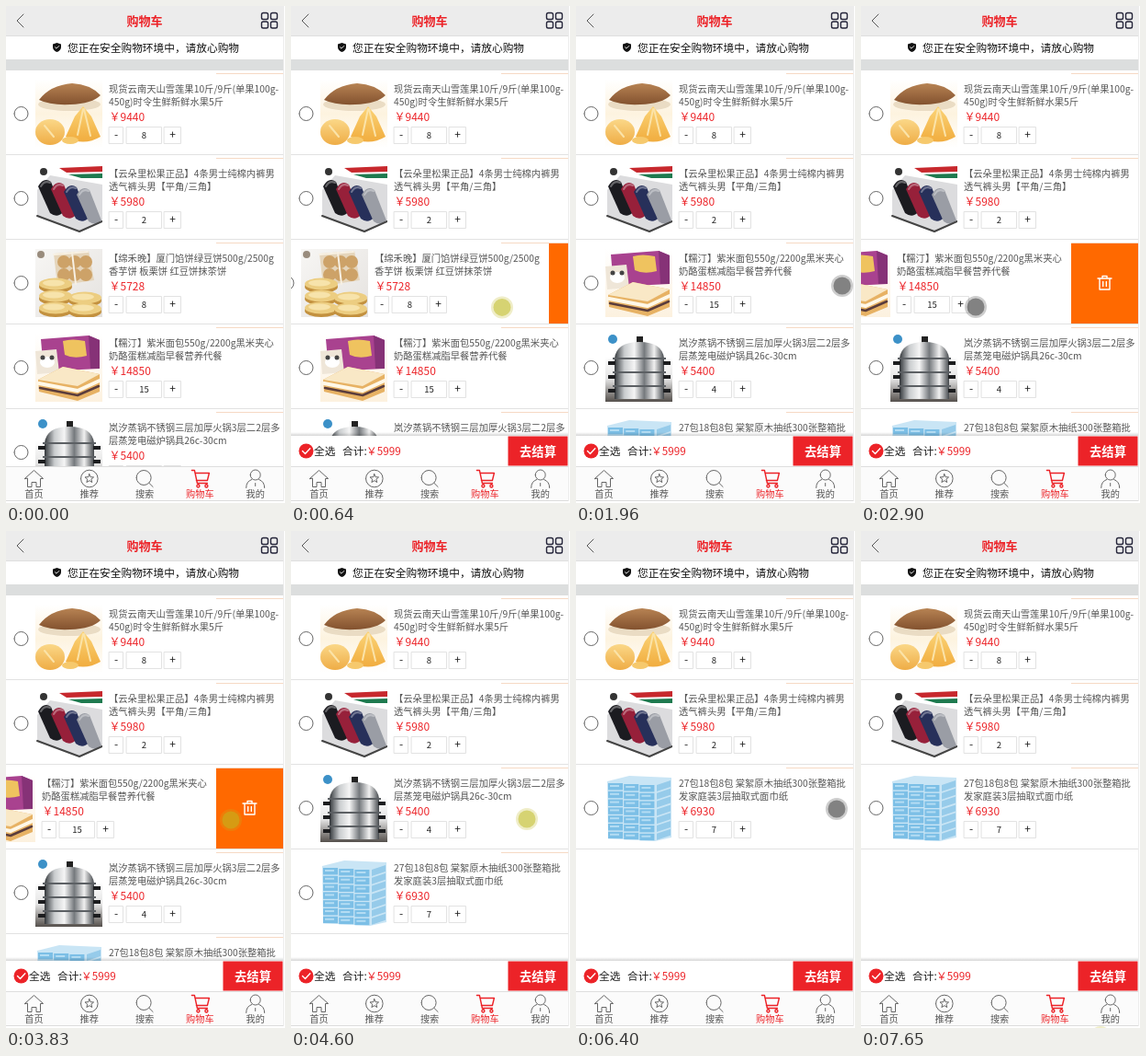
Animation of 304x540 px, one loop 7820 ms. Source, as an HTML page with a canvas:

```html
<!DOCTYPE html>
<html lang="zh-CN">
<head>
<meta charset="utf-8">
<title>购物车</title>
<style>
html, body { margin: 0; width: 100%; height: 100%; overflow: hidden; background: #fff; }
canvas { display: block; width: 304px; height: 540px; }
</style>
</head>
<body>
<canvas id="stage"></canvas>
<script>
const W = 304, H = 540, PAGE = 302, LOOP = 7820, STEP = 77;
const LIST_TOP = 70, ROW_H = 92, OPEN = 73, PHOTO = 73;
const RED = '#ec2328', ORANGE = '#ff6900', LINE = '#e2e2e2';
const FONT = '"Noto Sans CJK SC", "Noto Sans CJK", "Noto Sans", sans-serif';

const canvas = document.getElementById('stage');
const dpr = window.devicePixelRatio || 1;
canvas.width = W * dpr;
canvas.height = H * dpr;
const c = canvas.getContext('2d');

// Drawing helpers
function text(s, x, y, size, color, align = 'left', weight = 400) {
  c.font = `${weight} ${size}px ${FONT}`;
  c.textAlign = align;
  c.fillStyle = color;
  c.fillText(s, x, y);
}
function rect(x, y, w, h, color) {
  c.fillStyle = color;
  c.fillRect(x, y, w, h);
}
function box(x, y, w, h) {
  c.strokeStyle = LINE;
  c.lineWidth = 1;
  c.strokeRect(x, y, w, h);
}
function oval(x, y, rx, ry, color, turn = 0) {
  c.beginPath();
  c.ellipse(x, y, rx, ry, turn, 0, Math.PI * 2);
  c.fillStyle = color;
  c.fill();
}
function fill(d, color) {
  c.fillStyle = color;
  c.fill(new Path2D(d));
}
function line(d, color, width = 1) {
  c.strokeStyle = color;
  c.lineWidth = width;
  c.lineJoin = c.lineCap = 'round';
  c.stroke(new Path2D(d));
}
function blend(x0, y0, x1, y1, ...colors) {
  const g = c.createLinearGradient(x0, y0, x1, y1);
  colors.forEach((s, i) => g.addColorStop(i / (colors.length - 1), s));
  return g;
}
function at(x, y, draw) {
  c.save();
  c.translate(x, y);
  draw();
  c.restore();
}
const ring = (x, y, r) => `M${x - r} ${y}a${r} ${r} 0 1 0 ${2 * r} 0a${r} ${r} 0 1 0 ${-2 * r} 0`;

// Product pictures
function drawFruit() {
  rect(0, 0, PHOTO, 74, blend(0, 0, 0, 74, '#fff', '#fdf3df', '#fff'));
  oval(37, 27, 34, 7, '#eadcc4');
  fill('M4 22Q16 6 40 4Q60 5 71 17Q62 26 38 27Q16 28 4 22Z', blend(0, 4, 0, 27, '#b78353', '#83522f'));
  oval(16, 57, 16, 14, blend(0, 42, 0, 70, '#fbd98a', '#efae48'));
  fill('M33 62L43 40L52 29L61 40L71 62Q52 73 33 62Z', blend(0, 29, 0, 70, '#fbd477', '#f0aa3b'));
  line('M52 32L46 60M53 32L60 61M10 50L20 62', '#fbe3a8', 2);
  oval(38, 66, 9, 4, '#f6c96d');
}
function drawBriefs() {
  oval(9, 8, 4, 4, '#333');
  fill('M26 4L73 2V8L34 9Z', '#c7282d');
  fill('M36 11L73 10V15L50 15Z', '#1e7a4f');
  fill('M2 28L16 12L73 22V62L48 73L2 56Z', '#dcdcde');
  ['#1b1b20', '#97203a', '#27305a', '#9a9da5'].forEach((color, i) =>
    at(3 + i * 14, 19 + i * 3, () => {
      fill('M0 5Q6 -6 14 0L27 33Q21 40 13 34Z', color);
      line('M3 5Q7 -2 13 1', '#ffffff55', 2);
    }));
  line('M2 56L48 73L73 62', '#444', 2);
}
function drawPies() {
  rect(0, 0, PHOTO, 74, blend(0, 0, 73, 74, '#f7f6f4', '#e5e2df'));
  oval(6, 6, 4, 4, '#998c7d');
  fill('M20 5L58 2L64 34L24 40Z', '#e5d5bb');
  for (let i = 0; i < 6; i++) oval(31 + i % 3 * 12, 14 + (i / 3 | 0) * 14, 7, 7, '#cda268');
  line('M20 6L57 3M40 4L44 38', '#f8f1e4', 2);
  [[22, 38], [22, 51], [22, 64], [54, 53], [54, 65]].forEach(([x, y]) => {
    oval(x, y + 3, 18, 7, '#c3913f');
    oval(x, y, 18, 6.5, '#eccd81');
    oval(x - 2, y - 1, 12, 3.5, '#f7e3ab');
  });
}
function drawBread() {
  rect(0, 0, PHOTO, 74, blend(0, 0, 0, 74, '#fff', '#fcf1df'));
  fill('M6 6L58 2L70 7V38L9 41Z', '#a9428f');
  fill('M58 2L70 7V38L60 38Z', '#863277');
  fill('M30 8Q40 5 54 8L56 24Q42 28 32 23Z', '#efc35f');
  fill('M0 19L23 17L26 42L2 44Z', '#efe6d8');
  oval(13, 31, 8, 6, '#fff');
  [8, 18].forEach(x => oval(x, 26, 2.5, 2.5, '#444'));
  fill('M3 50L30 36L70 44V63L46 73L4 63Z', '#e7b264');
  fill('M3 50L30 36L70 44L46 57Z', '#f9e8c6');
  line('M4 54L46 62L70 51', '#fff8e8', 4);
  line('M5 59L46 67L69 57', '#5b3d3c', 2.5);
}
function drawSteamer() {
  rect(0, 0, PHOTO, 74, blend(0, 0, 0, 74, '#fff', '#fff', '#e4e4e4', '#55504c'));
  oval(8, 6, 5, 5, '#3c91c8');
  const steel = blend(10, 0, 64, 0, '#33373b', '#c9ccce', '#f5f5f5', '#75797d', '#f0f0f0', '#45494d');
  rect(34, 3, 7, 7, '#222');
  fill('M10 27Q12 9 37 9Q62 9 64 27Z', steel);
  for (let y = 27; y < 70; y += 15) {
    rect(10, y, 54, 14, steel);
    rect(8, y - 1, 58, 2, '#5c6064');
    [3, 63].forEach(x => rect(x, y + 3, 8, 4, '#1c1d1f'));
  }
}
function drawTissues() {
  fill('M2 8L26 2L72 4V69L54 73L3 70Z', '#c9e5f5');
  for (let r = 0; r < 7; r++) {
    const y = 10 + r * 8.8;
    for (let k = 0; k < 3; k++) {
      rect(3 + k * 17.2, y + k, 16, 7.4, '#7cbfe6');
      rect(5 + k * 17.2, y + k + 2, 10, 2, '#b3dcf3');
    }
    fill(`M56 ${y + 2}l15 -5v7l-15 5Z`, '#96cbea');
  }
}

const items = [
  { title: ['现货云南天山雪莲果10斤/9斤(单果100g-', '450g)时令生鲜新鲜水果5斤'], price: 9440, count: 8, photo: drawFruit },
  { title: ['【云朵里松果正品】4条男士纯棉内裤男', '透气裤头男【平角/三角】'], price: 5980, count: 2, photo: drawBriefs },
  { title: ['【绵禾晚】厦门馅饼绿豆饼500g/2500g', '香芋饼 板栗饼 红豆饼抹茶饼'], price: 5728, count: 8, photo: drawPies },
  { title: ['【糯汀】紫米面包550g/2200g黑米夹心', '奶酪蛋糕减脂早餐营养代餐'], price: 14850, count: 15, photo: drawBread },
  { title: ['岚汐蒸锅不锈钢三层加厚火锅3层二2层多', '层蒸笼电磁炉锅具26c-30cm'], price: 5400, count: 4, photo: drawSteamer },
  { title: ['27包18包8包 棠絮原木抽纸300张整箱批', '发家庭装3层抽取式面巾纸'], price: 6930, count: 7, photo: drawTissues }
];

// Each swipe opens the third row; the tap that follows deletes it
const swipes = [
  { start: 570, turn: 955, tap: 1720, gone: 1890 },
  { start: 2660, turn: 2891, tap: 3430, gone: 3980 },
  { start: 4600, turn: 4842, tap: 5930, gone: 6100 }
];
const [first, second, third] = swipes;

const moves = [];
function go(start, end, x, y) {
  const last = moves[moves.length - 1] || { x: 250, y: 575 };
  moves.push({ start, end, x, y, from: last });
}
function swipe(s, end, far, back) {
  go(s.start, s.turn, ...far);
  go(s.turn, end, ...back);
}
go(33, 260, 251, 330);
swipe(first, 1260, [146, 317], [290, 304]);
go(2360, 2510, 282, 301);
swipe(second, 3130, [125, 327], [245, 314]);
go(4380, 4600, 257, 313);
swipe(third, 5150, [150, 318], [294, 302]);
go(5550, 5780, 284, 302);
go(6400, 6630, 248, 500);
go(6800, 7100, 261, 550);

function pointerAt(t) {
  const m = moves.filter(m => m.start <= t).pop();
  if (!m) return moves[0].from;
  const elapsed = Math.floor((t - m.start) / STEP + 0.2) * STEP;
  const p = Math.min(1, elapsed / (m.end - m.start));
  return { x: m.from.x + (m.x - m.from.x) * p, y: m.from.y + (m.y - m.from.y) * p };
}
// The row follows the finger up to the width of the delete button
function slideAt(t) {
  const s = swipes.find(s => t >= s.start && t < s.gone);
  if (!s) return 0;
  const pulled = pointerAt(s.start).x - pointerAt(Math.min(t, s.turn - 1)).x;
  return Math.round(Math.min(OPEN, pulled));
}
const isDown = t => t >= 7650 || swipes.some(s =>
  t >= s.start && t < s.turn - STEP || t >= s.tap && t < s.gone);

function drawHeader() {
  rect(0, 0, PAGE, 32, '#ececec');
  rect(0, 32, PAGE, 1, '#dedede');
  line('M19 9L12 16L19 23', '#555');
  text('购物车', 151, 20.5, 13, RED, 'center', 700);
  for (let i = 0; i < 4; i++) {
    c.beginPath();
    c.roundRect(278.5 + i % 2 * 10, 7.5 + (i >> 1) * 9.5, 7, 7, 1.8);
    c.strokeStyle = '#25253a';
    c.lineWidth = 1.4;
    c.stroke();
  }
  fill('M55.5 40L60 41.5V45Q59.5 48.5 55.5 50Q51.5 48.5 51 45V41.5Z', '#111');
  line('M53.5 44.8L55 46.2L57.7 43.5', '#fff', 0.9);
  text('您正在安全购物环境中，请放心购物', 67, 49.5, 11.7, '#111');
  rect(0, 58, PAGE, 12, '#dcdede');
}

function drawItem({ title, price, count, photo }) {
  line(ring(16.5, 47, 7.5), '#555', 0.9);
  at(32, 10, () => {
    c.beginPath();
    c.rect(0, 0, PHOTO, 74);
    c.clip();
    photo();
  });
  title.forEach((s, i) => text(s, 112, 23.5 + i * 14, 10.3, '#555'));
  text('￥' + price, 112.5, 55, 12, RED);
  box(112.5, 61.5, 15, 18);
  box(131.5, 61.5, 38, 18);
  box(172.5, 61.5, 18, 18);
  text('-', 120, 74, 12, '#222', 'center');
  text(count, 150.5, 74, 9.5, '#222', 'center');
  text('+', 181.5, 74, 12, '#222', 'center');
}

function drawDelete() {
  rect(0, 4, OPEN, 87, ORANGE);
  line('M29 42H44M34 42V39.5H39V42M31 42V54H42V42M34.7 45.5V50.5M38.3 45.5V50.5', '#fff', 1.4);
}

function drawList(t) {
  c.save();
  c.beginPath();
  c.rect(0, LIST_TOP, PAGE, 430);
  c.clip();
  const gone = swipes.filter(s => t >= s.gone).length;
  const shown = [...items.slice(0, 2), ...items.slice(2 + gone)].slice(0, 5);
  shown.forEach((item, i) => at(0, LIST_TOP + i * ROW_H, () => {
    const dx = i === 2 ? slideAt(t) : 0;
    rect(PAGE - OPEN, 3, OPEN, 1, '#f6d9c4');
    at(-dx, 0, () => drawItem(item));
    if (dx) at(PAGE - dx, 0, drawDelete);
    rect(0, 91, PAGE, 1, LINE);
  }));
  c.restore();
}

function drawCheckout() {
  rect(0, 463, PAGE, 4, blend(0, 463, 0, 467, 'rgba(0,0,0,0)', 'rgba(0,0,0,.16)'));
  rect(0, 467, PAGE, 33, '#fff');
  oval(16.5, 483.5, 8, 8, RED);
  line('M12.5 483.5L15.5 486.5L20.8 480.8', '#fff', 1.4);
  text('全选', 25, 488, 11.7, '#222');
  text('合计:', 56, 488, 11.7, '#222');
  text('￥5999', 82, 488, 11.7, RED);
  rect(236.5, 467.5, 65, 32, RED);
  text('去结算', 269, 489, 13.3, '#fff', 'center', 700);
}

const star = 'M' + Array.from({ length: 10 }, (_, i) => {
  const a = i * Math.PI / 5 - Math.PI / 2, r = i % 2 ? 2.2 : 5;
  return `${r * Math.cos(a)} ${r * Math.sin(a)}`;
}).join('L') + 'Z';
const tabs = [
  ['首页', 'M-10 0L0 -9L10 0H7V9H2.5V4H-2.5V9H-7V0Z'],
  ['推荐', ring(0, 0, 9.3) + star],
  ['搜索', ring(-1, -1, 8) + 'M5 5L9 9'],
  ['购物车', 'M-9 -9H-6L-3 5H8M-5.5 -6H10L8 2H-4' + ring(-2, 8, 1.5) + ring(7, 8, 1.5)],
  ['我的', ring(0, -4, 5.5) + 'M-10 10Q-10 3 -4 1M10 10Q10 3 4 1M0 5V8']
];
function drawTabs() {
  rect(0, 500, PAGE, 38, '#fbfbfb');
  rect(0, 500, PAGE, 1, '#dedede');
  tabs.forEach(([label, icon], i) => {
    const x = 30.5 + i * 60.3, active = i === 3;
    at(x, 513.5, () => line(icon, active ? RED : '#666', active ? 1.4 : 1));
    text(label, x, 534, 10.2, active ? RED : '#555', 'center');
  });
  rect(0, 537, PAGE, 1, '#dcdcdc');
}

function drawPointer(t) {
  const { x, y } = pointerAt(t);
  const tone = isDown(t) ? '190,185,30' : '55,55,55';
  oval(x, y, 12, 12, `rgba(${tone},.25)`);
  oval(x, y, 9.5, 9.5, `rgba(${tone},.5)`);
}

function frame(t) {
  c.setTransform(dpr, 0, 0, dpr, 0, 0);
  rect(0, 0, W, H, '#fff');
  drawHeader();
  drawList(t);
  if (t >= first.start) drawCheckout();
  drawTabs();
  rect(PAGE, 0, 1, 538, '#ededed');
  drawPointer(t);
}

const begin = performance.now();
function tick() {
  frame((performance.now() - begin) % LOOP);
  requestAnimationFrame(tick);
}
tick();
</script>
</body>
</html>
```
